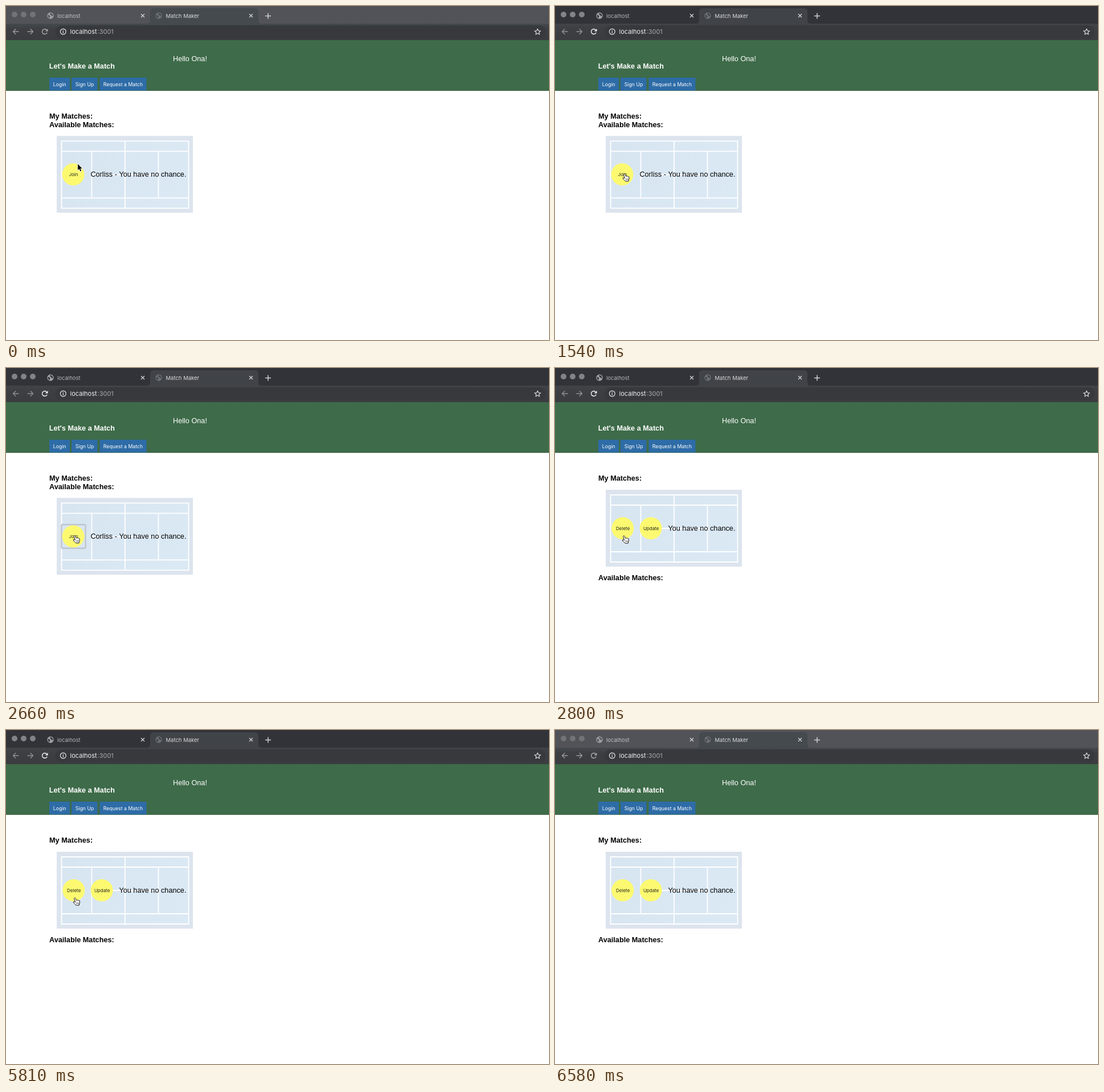
An HTML page with a canvas for the animation above (7070 ms loop, 953x587 px).

```html
<!DOCTYPE html>
<html lang="en">
<head>
<meta charset="utf-8">
<title>Match Maker</title>
<style>
html, body { margin: 0; width: 100%; height: 100%; overflow: hidden; background: #fff; }
canvas { display: block; width: 953px; height: 587px; }
</style>
</head>
<body>
<canvas id="stage"></canvas>
<script>
const W = 953, H = 587, LOOP = 7070, STEP = 70;
const PAGE = '"Liberation Sans", Arial, sans-serif';
const UI = 'Inter, Roboto, sans-serif';
const canvas = document.getElementById('stage');
const ratio = window.devicePixelRatio || 1;
canvas.width = Math.round(W * ratio);
canvas.height = Math.round(H * ratio);
const c = canvas.getContext('2d');

const FOCUS = 770, HAND = 1120, PRESS = 2380, JOINED = 2730, BLUR = 5880, LEAVE = 6090;

// Pointer hotspot: time, x, y
const PATH = [
  [0, 126, 278], [560, 123, 289.5], [1050, 123, 289.5], [1330, 122, 299],
  [1540, 122, 295], [2100, 122, 295], [2380, 121, 294.5], [2590, 121, 294.5],
  [2800, 121.3, 295], [6020, 121.3, 295], [6580, 499, 588]
];

function pointerAt(t) {
  for (let i = 1; i < PATH.length; i++) {
    const a = PATH[i - 1], b = PATH[i];
    if (t <= b[0]) {
      const u = (t - a[0]) / (b[0] - a[0]);
      const k = u * u * (3 - 2 * u);
      return [a[1] + (b[1] - a[1]) * k, a[2] + (b[2] - a[2]) * k];
    }
  }
  return null;
}

function rect(x, y, w, h, color) {
  c.fillStyle = color;
  c.fillRect(x, y, w, h);
}

function disc(x, y, r, color) {
  c.fillStyle = color;
  c.beginPath();
  c.arc(x, y, r, 0, Math.PI * 2);
  c.fill();
}

function ring(x, y, r, color, width) {
  c.strokeStyle = color;
  c.lineWidth = width;
  c.beginPath();
  c.arc(x, y, r, 0, Math.PI * 2);
  c.stroke();
}

// Each argument after the width is one polyline: [x, y, x, y, ...]
function lines(color, width, ...runs) {
  c.strokeStyle = color;
  c.lineWidth = width;
  c.beginPath();
  for (const p of runs) {
    c.moveTo(p[0], p[1]);
    for (let i = 2; i < p.length; i += 2) c.lineTo(p[i], p[i + 1]);
  }
  c.stroke();
}

function text(s, x, y, font, color, align = 'left') {
  c.font = font;
  c.fillStyle = color;
  c.textAlign = align;
  c.fillText(s, x, y);
}

function globe(x, y, color, land) {
  disc(x, y, 5.7, color);
  c.fillStyle = land;
  c.beginPath();
  c.moveTo(x - 4.4, y - 1.5);
  c.quadraticCurveTo(x - 1, y - 1, x - 0.5, y + 1);
  c.quadraticCurveTo(x - 1.5, y + 2, x - 1.6, y + 4.3);
  c.quadraticCurveTo(x - 4.8, y + 2.5, x - 4.4, y - 1.5);
  c.moveTo(x - 0.6, y - 4.5);
  c.quadraticCurveTo(x + 4.2, y - 4, x + 4.5, y + 0.6);
  c.quadraticCurveTo(x + 2.6, y + 1.6, x + 1.8, y - 0.6);
  c.quadraticCurveTo(x - 1.2, y - 1.4, x - 0.6, y - 4.5);
  c.fill();
}

function cross(x, y, color) {
  lines(color, 1.3, [x - 3, y - 3, x + 3, y + 3], [x + 3, y - 3, x - 3, y + 3]);
}

function star(x, y, r, color) {
  const p = [];
  for (let i = 0; i <= 10; i++) {
    const a = -Math.PI / 2 + i * Math.PI / 5;
    const d = i % 2 ? r * 0.45 : r;
    p.push(x + d * Math.cos(a), y + d * Math.sin(a));
  }
  lines(color, 1.1, p);
}

function drawBrowser(t) {
  const active = t >= FOCUS && t < BLUR;
  const bar = active ? '#323338' : '#525358';
  const tab = active ? '#404347' : '#454a4e';
  const lit = t >= 630 && t < FOCUS;
  const dim = active ? '#8f9195' : '#999b9e';
  rect(0, 0, W, 31, bar);
  for (const x of [15, 31, 47]) disc(x, 15, 5, lit ? '#a4a5a8' : active ? '#828388' : '#727377');

  c.fillStyle = tab;
  c.beginPath();
  c.moveTo(247, 31);
  c.quadraticCurveTo(253, 31, 253, 25);
  c.lineTo(253, 10);
  c.quadraticCurveTo(253, 4, 259, 4);
  c.lineTo(437, 4);
  c.quadraticCurveTo(443, 4, 443, 10);
  c.lineTo(443, 25);
  c.quadraticCurveTo(443, 31, 449, 31);
  c.fill();

  const tool = c.createLinearGradient(0, 31, 0, 60);
  tool.addColorStop(0, tab);
  tool.addColorStop(0.3, '#3d3f43');
  tool.addColorStop(1, '#3b3c40');
  c.fillStyle = tool;
  c.fillRect(0, 31, W, 29);
  c.fillStyle = '#37393d';
  c.beginPath();
  c.roundRect(87, 34, 860, 23, 11.5);
  c.fill();

  globe(78, 17, active ? '#a0a1a5' : '#9c9da0', bar);
  globe(268, 17, '#6c7074', tab);
  text('localhost', 90, 20.5, `9.5px ${UI}`, active ? '#b4b5b9' : '#c0c1c4');
  text('Match Maker', 280.5, 20.5, `9.5px ${UI}`, '#d9dadc');
  cross(240, 17, '#d4d5d8');
  cross(430, 17, '#d4d5d8');
  lines('#d0d1d4', 1.5, [455, 17.5, 465, 17.5], [460, 12.5, 460, 22.5]);

  lines(dim, 1.3, [22.5, 45, 12.5, 45], [17.3, 40.2, 12.5, 45, 17.3, 49.8]);
  lines(dim, 1.3, [37.5, 45, 47.5, 45], [42.7, 40.2, 47.5, 45, 42.7, 49.8]);
  const reload = active ? '#f4f4f5' : '#aaacae';
  c.strokeStyle = reload;
  c.lineWidth = 1.5;
  c.beginPath();
  c.arc(68, 45, 4.4, 0.4, Math.PI * 1.75);
  c.stroke();
  c.fillStyle = reload;
  c.beginPath();
  c.moveTo(73.5, 39.8);
  c.lineTo(73.5, 44.4);
  c.lineTo(68.9, 44.4);
  c.fill();

  ring(100.3, 45, 4.9, '#e6e7e9', 1.2);
  rect(99.7, 44.2, 1.3, 3.5, '#e6e7e9');
  rect(99.7, 42, 1.3, 1.3, '#e6e7e9');
  text('localhost', 112.6, 49, `11px ${UI}`, '#f0f1f2');
  text(':3001', 160.5, 49, `11px ${UI}`, '#a9abae');
  star(933, 45.5, 5.6, '#dfe0e2');
}

function drawHeader() {
  rect(0, 60, W, 89, '#3e6b49');
  rect(0, 148, W, 1, '#38613f');
  rect(0, 149, W, 1, '#e4e9e5');
  text("Let's Make a Match", 75.8, 109.6, `bold 12.7px ${PAGE}`, '#fff');
  text('Hello Ona!', 293, 97, `12.7px ${PAGE}`, '#fff');
  const buttons = [['Login', 76, 36], ['Sign Up', 115, 45.5], ['Request a Match', 164.5, 82]];
  for (const [label, x, w] of buttons) {
    rect(x, 126, w, 22.5, '#2e6ca7');
    text(label, x + w / 2 + (w < 50 ? 0.2 : 0), 141, `8.75px ${UI}`, '#fff', 'center');
  }
}

function drawCourt(y) {
  rect(89, y, 239, 135, '#dce4ee');
  const floor = c.createLinearGradient(97, y, 321, y + 100);
  floor.addColorStop(0, '#d7e5f1');
  floor.addColorStop(0.5, '#d9e7f3');
  floor.addColorStop(1, '#dae9f4');
  c.fillStyle = floor;
  c.fillRect(97, y + 8, 224, 119);
  lines('#fff', 1.8,
    [97.5, y + 9, 320.5, y + 9, 320.5, y + 127, 97.5, y + 127, 97.5, y + 8],
    [97, y + 27, 321, y + 27], [97, y + 109, 321, y + 109],
    [209, y + 9, 209, y + 127],
    [150.5, y + 27, 150.5, y + 109], [267.5, y + 27, 267.5, y + 109],
    [150.5, y + 68, 267.5, y + 68]);
}

function roundButton(label, x, y) {
  disc(x, y, 19.5, '#fcf971');
  text(label, x + 0.4, y + 3, `8px ${UI}`, '#25251c', 'center');
}

function drawMatches(t) {
  const joined = t >= JOINED;
  const top = joined ? 214 : 228.3;
  const bold = `bold 12.7px ${PAGE}`, plain = `12.7px ${PAGE}`;
  text('My Matches:', 76, 198.2, bold, '#000');
  text('Available Matches:', 76, joined ? 373 : 212.6, bold, '#000');
  drawCourt(top);
  if (joined) {
    roundButton('Delete', 118.8, 281.7);
    roundButton('Update', 168.2, 281.7);
  } else {
    if (t >= PRESS) {
      c.strokeStyle = '#bfc5cd';
      c.lineWidth = 2.4;
      c.beginPath();
      c.roundRect(97.5, 275.2, 42, 41.5, 2);
      c.stroke();
    }
    roundButton('Join', 118, 296);
    text('Corliss - ', 148.4, top + 71.7, plain, '#000');
  }
  text('You have no chance.', 198.4, top + 71.7, plain, '#000');
}

function drawClick(t, x, y) {
  const start = t < FOCUS ? 630 : PRESS;
  const end = t < FOCUS ? FOCUS : 2660;
  if (t < start || t >= end) return;
  ring(x, y, Math.min(24.5, 10.5 + (t - start) / 10), '#000', 1.5);
}

function drawArrow() {
  c.beginPath();
  c.moveTo(0, -0.3);
  for (const [x, y] of [[0, 10.6], [2.5, 8.3], [4.3, 12.6], [6.2, 11.8], [4.4, 7.6], [7.7, 7.5]]) c.lineTo(x, y);
  c.closePath();
  c.strokeStyle = '#fff';
  c.lineWidth = 1.6;
  c.stroke();
  c.fillStyle = '#000';
  c.fill();
}

function drawHand() {
  c.beginPath();
  c.moveTo(0.4, 7.8);
  c.lineTo(-1.5, 2);
  c.bezierCurveTo(-2, -0.4, 0.3, -0.8, 1, 1.2);
  c.lineTo(2.2, 4.4);
  c.quadraticCurveTo(3.4, 3.2, 4.4, 4.3);
  c.quadraticCurveTo(5.7, 3.4, 6.3, 4.7);
  c.quadraticCurveTo(7.8, 4.2, 8, 6);
  c.quadraticCurveTo(8.7, 9, 7.2, 11);
  c.lineTo(7, 13);
  c.lineTo(1.8, 13);
  c.quadraticCurveTo(-0.5, 10.8, -3, 8.3);
  c.quadraticCurveTo(-3.2, 6.2, -1.2, 6.9);
  c.closePath();
  c.fillStyle = '#fff';
  c.fill();
  c.strokeStyle = '#151515';
  c.lineWidth = 1;
  c.stroke();
  lines('#333', 0.7, [2.4, 8.2, 2.6, 11], [4.2, 8, 4.4, 11], [6, 8, 6.1, 10.8]);
}

function drawPointer(t) {
  const p = pointerAt(t);
  if (!p || t >= 6580) return;
  drawClick(t, p[0], p[1]);
  c.save();
  c.translate(p[0], p[1]);
  if (t >= HAND && t < LEAVE) drawHand();
  else drawArrow();
  c.restore();
}

function draw(now) {
  const t = Math.floor((now % LOOP) / STEP) * STEP;
  c.setTransform(ratio, 0, 0, ratio, 0, 0);
  c.lineJoin = 'round';
  rect(0, 0, W, H, '#fff');
  drawBrowser(t);
  drawHeader();
  drawMatches(t);
  drawPointer(t);
}

const begin = performance.now();
function tick() {
  draw(performance.now() - begin);
  requestAnimationFrame(tick);
}
tick();
</script>
</body>
</html>
```
